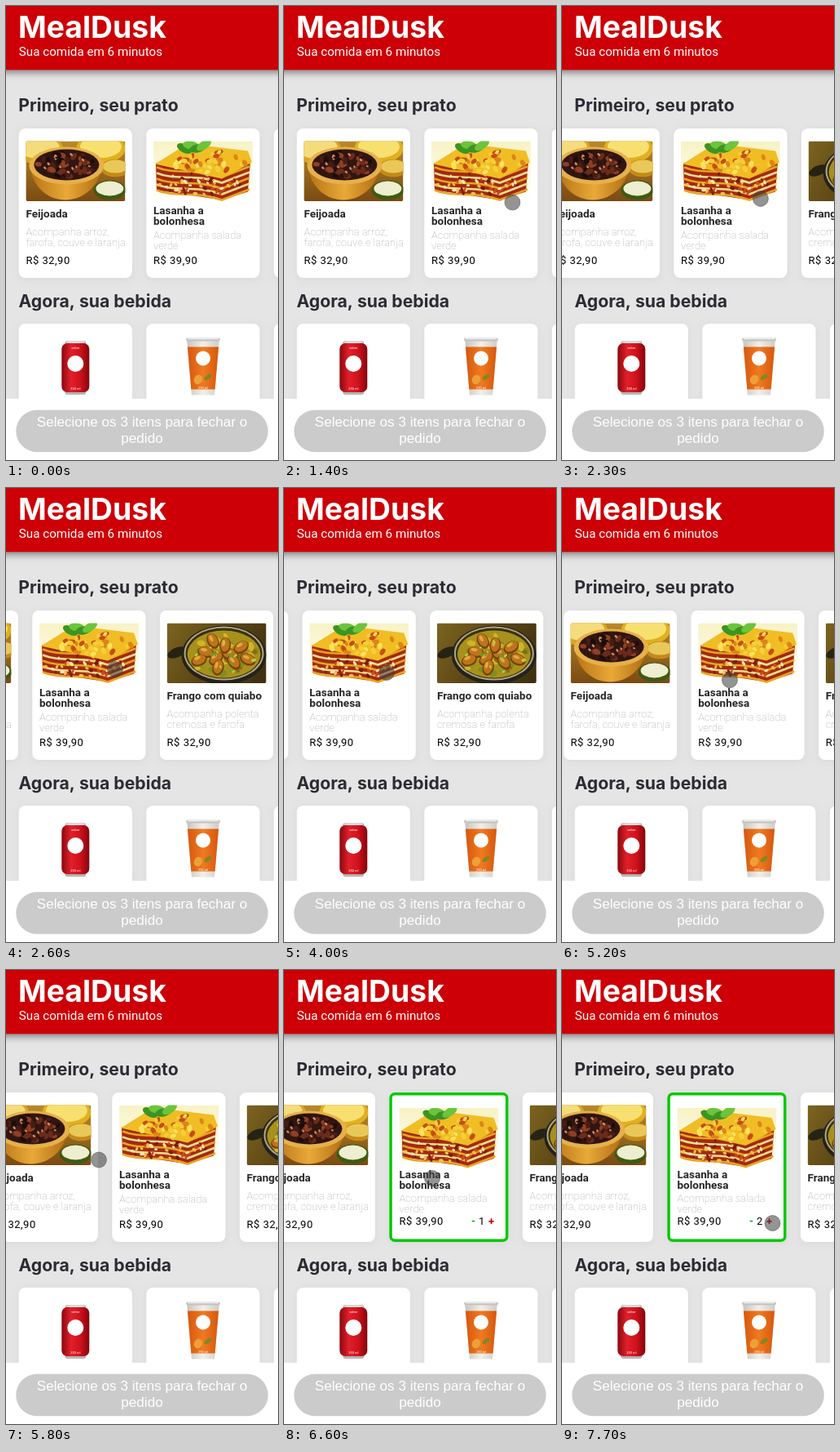
An HTML page with a canvas that plays this animation: 334 by 556 pixels, repeating every 8 s.

```html
<!DOCTYPE html>
<html lang="pt-BR">
<head>
<meta charset="utf-8">
<title>MealDusk</title>
<style>
html, body { margin: 0; width: 100%; height: 100%; overflow: hidden; background: #e5e5e5; }
canvas { display: block; width: 334px; height: 556px; }
</style>
</head>
<body>
<canvas id="stage"></canvas>
<script>
const W = 334, H = 556, LOOP = 8000, STEP = 100;
const canvas = document.getElementById('stage');
const ctx = canvas.getContext('2d');
const dpr = window.devicePixelRatio || 1;
canvas.width = W * dpr;
canvas.height = H * dpr;

const LEFT = 15.7, CARD_W = 139.2, CARD_H = 183, PITCH = 156.6, PAD = 8.7, BORDER = 3.5;
const IMG_W = 122, IMG_H = 73.5;
const ROBOTO = 'Roboto, sans-serif', INTER = 'Inter, sans-serif', ARIAL = '"Liberation Sans", Arial, sans-serif';
const SELECT_AT = 6500, COUNT_AT = 7700, CURSOR_AT = 1100;

// Each gesture glides the pointer, and the row of cards when dragging, to a new place.
const START = { x: 298, y: 446, scroll: 0 };
const move = (from, to, x, y, scroll) => ({ from, to, x, y, scroll });
const gestures = [
  move(1000, 1400, 280.5, 240.5),
  move(2200, 2600, 134, 222, 140),
  move(2800, 3000, 240, 246),
  move(3100, 3500, 232, 249, 149.7),
  move(3600, 4000, 126, 226),
  move(4000, 4700, 186, 231, 33),
  move(4700, 5300, 210, 236, 10),
  move(5400, 5800, 114, 232.5, 42),
  move(5900, 6300, 204, 245),
  move(6400, 6600, 182, 255, 43),
  move(6700, 7100, 265, 311),
  move(7200, 7500, 258.5, 310)
];

function poseAt(t) {
  const pose = { ...START };
  for (const g of gestures) {
    const u = Math.min(1, Math.max(0, (t - g.from) / (g.to - g.from)));
    for (const k in pose) pose[k] += ((g[k] ?? pose[k]) - pose[k]) * u;
  }
  return pose;
}

function rect(x, y, w, h, color) {
  ctx.fillStyle = color;
  ctx.fillRect(x, y, w, h);
}
function round(x, y, w, h, r, color) {
  ctx.fillStyle = color;
  ctx.beginPath();
  ctx.roundRect(x, y, w, h, r);
  ctx.fill();
}
function oval(x, y, rx, ry, color, turn = 0) {
  ctx.fillStyle = color;
  ctx.beginPath();
  ctx.ellipse(x, y, rx, ry, turn, 0, 7);
  ctx.fill();
}
function poly(color, ...p) {
  ctx.fillStyle = color;
  ctx.beginPath();
  for (let i = 0; i < p.length; i += 2) ctx.lineTo(p[i], p[i + 1]);
  ctx.fill();
}
function fade(x0, y0, x1, y1, ...colors) {
  const g = ctx.createLinearGradient(x0, y0, x1, y1);
  colors.forEach((c, i) => g.addColorStop(i / (colors.length - 1), c));
  return g;
}
function text(str, x, y, font, color, align = 'left') {
  ctx.font = font;
  ctx.fillStyle = color;
  ctx.textAlign = align;
  ctx.fillText(str, x, y);
}
function shadow(color, blur, dy, draw) {
  ctx.save();
  ctx.shadowColor = color;
  ctx.shadowBlur = blur * dpr;
  ctx.shadowOffsetY = dy * dpr;
  draw();
  ctx.restore();
}
// scatters small pieces inside an oval
function scatter(seed, n, x, y, rx, ry, size, ...colors) {
  const rnd = () => (seed = (seed * 16807) % 2147483647) / 2147483647;
  rnd();
  for (let i = 0; i < n; i++) {
    const a = rnd() * 6.28, d = Math.sqrt(rnd()), s = size * (0.6 + rnd() * 0.6);
    oval(x + Math.cos(a) * rx * d, y + Math.sin(a) * ry * d, s, s * 0.65, colors[i % colors.length], rnd() * 3);
  }
}
function sideBowl(x, y, r, rim, food) {
  oval(x, y + 2, r, r * 0.6, rim);
  oval(x, y, r * 0.85, r * 0.45, food);
}

function beanStew() {
  rect(0, 0, IMG_W, IMG_H, fade(0, 0, 0, IMG_H, '#b98a2a', '#7a4a12'));
  sideBowl(16, 8, 30, '#d9a425', '#f4dc7c');
  sideBowl(92, 7, 30, '#e0b020', '#f8e070');
  sideBowl(110, 31, 18, '#c48a18', '#e9c85a');
  sideBowl(103, 58, 20, '#3f5a12', '#eeeed0');
  ctx.fillStyle = fade(6, 0, 94, 0, '#b87416', '#e8a938', '#b06a12');
  ctx.beginPath();
  ctx.moveTo(5, 30);
  ctx.bezierCurveTo(12, 86, 84, 86, 94, 30);
  ctx.fill();
  oval(50, 30, 46, 23, '#e6b04a');
  oval(50, 29, 40, 19, '#301510');
  scatter(17, 46, 50, 29, 35, 15, 5, '#6b2b1b', '#1c0d0b', '#8f3f25', '#481d13');
  scatter(5, 12, 50, 28, 30, 12, 2, '#d08a60');
}

function lasagna() {
  rect(0, 0, IMG_W, IMG_H, fade(0, 0, 0, IMG_H, '#f8f2c4', '#ffffff'));
  poly('#a32a10', 3, 27, 119, 25, 116, 62, 84, 72, 4, 60);
  ctx.lineWidth = 2.6;
  for (let i = 0; i < 5; i++) {
    const y = 32 + i * 7;
    ctx.strokeStyle = i % 2 ? '#f3dd92' : '#e8a420';
    ctx.beginPath();
    ctx.moveTo(4, y);
    ctx.bezierCurveTo(28, y + 10, 50, y, 84, y + 12);
    ctx.lineTo(118, y - 1);
    ctx.stroke();
  }
  scatter(29, 55, 60, 53, 54, 14, 2.6, '#7b1c0c', '#cc4a18', '#f0c04a', '#fbe6b0');
  poly('#f0bd24', 2, 28, 42, 3, 116, 12, 121, 26, 84, 46);
  scatter(11, 45, 68, 25, 46, 13, 4, '#fbe25c', '#dc8418', '#f6ce38', '#c44e14');
  for (let i = 0; i < 4; i++) {
    oval(38 + i * 8, 9 - (i % 2) * 4, 10, 5, i % 2 ? '#6cc43c' : '#3c9422', 0.5 - i * 0.35);
  }
}

function chicken() {
  rect(0, 0, IMG_W, IMG_H, fade(0, 0, IMG_W, IMG_H, '#7c6420', '#5a4414', '#3c2e10'));
  oval(12, 36, 12, 6, '#262315', -0.4);
  oval(70, 39, 52, 36, '#24221a');
  oval(70, 37, 49, 33, '#b0a684');
  oval(70, 37, 47, 31, '#3a300e');
  oval(70, 38, 45, 29, '#a8901c');
  scatter(41, 40, 70, 38, 40, 25, 5, '#d0b428', '#7e8f1d', '#8a6a14');
  for (let i = 0; i < 10; i++) {
    const a = i * 2.4, d = Math.sqrt((i + 0.5) / 10);
    const x = 70 + Math.cos(a) * 34 * d, y = 37 + Math.sin(a) * 21 * d;
    oval(x, y + 1, 10, 7, '#75400c', a);
    oval(x, y, 8.5, 5.6, '#bd741a', a);
    oval(x - 2, y - 2, 4, 2, '#e2a840', a);
  }
  scatter(8, 16, 70, 38, 40, 24, 2.6, '#6f9a23', '#b4cc48');
}

function can(x, y) {
  round(x + 4, y, 26, 66, 3, '#b5b5b5');
  round(x, y + 3, 34, 60, 7, fade(x, 0, x + 34, 0, '#8c070f', '#e0202a', '#d0121c', '#84060d'));
  oval(x + 17, y + 1.5, 12, 1.6, '#dddddd');
  oval(x + 17, y + 28, 10, 10, '#ffffff');
  text('sabor', x + 17, y + 10, '4px ' + ROBOTO, '#ffffff', 'center');
  text('350 ml', x + 17, y + 60, '4px ' + ROBOTO, '#ffffff', 'center');
}

function cup(x, y) {
  const wall = (top, bottom, color) => {
    const a = top * 0.085, b = bottom * 0.085;
    poly(color, x + a, y + top, x + 40 - a, y + top, x + 40 - b, y + bottom, x + b, y + bottom);
  };
  wall(2, 70, fade(x, 0, x + 40, 0, '#c8c4be', '#f2efea', '#cfcbc5'));
  wall(11, 63, fade(x, 0, x + 40, 0, '#d4560e', '#f07a20', '#d4560e'));
  round(x - 1, y, 42, 4, 2, '#c4c4c2');
  round(x + 1, y, 38, 1.8, 1, '#eeeeec');
  oval(x + 20, y + 25, 9, 9, '#ffffff');
  oval(x + 14, y + 51, 5, 6, '#eda03a', 0.5);
  oval(x + 26, y + 48, 5, 2.5, '#7c8a24', -0.6);
  text('290 ml', x + 20, y + 62, '4px ' + ROBOTO, '#ffffff', 'center');
}

const dishes = [
  { name: ['Feijoada'], info: ['Acompanha arroz,', 'farofa, couve e laranja'], price: 'R$ 32,90', paint: beanStew },
  { name: ['Lasanha a', 'bolonhesa'], info: ['Acompanha salada', 'verde'], price: 'R$ 39,90', paint: lasagna },
  { name: ['Frango com quiabo'], info: ['Acompanha polenta', 'cremosa e farofa'], price: 'R$ 32,90', paint: chicken }
];

function cardBox(x, y, w) {
  shadow('rgba(0,0,0,.06)', 8, 2, () => round(x, y, w, CARD_H, 8, '#ffffff'));
}

function dishCard(dish, x, picked, count) {
  const top = 150, inset = picked ? BORDER : 0;
  cardBox(x, top, CARD_W + inset * 2);
  if (picked) {
    ctx.strokeStyle = '#03c804';
    ctx.lineWidth = BORDER;
    ctx.beginPath();
    ctx.roundRect(x + BORDER / 2, top + BORDER / 2, CARD_W + BORDER, CARD_H - BORDER, 5);
    ctx.stroke();
  }
  const left = x + PAD + inset;
  ctx.save();
  ctx.translate(left, top + 15.5 + inset);
  ctx.beginPath();
  ctx.roundRect(0, 0, IMG_W, IMG_H, 2);
  ctx.clip();
  dish.paint();
  ctx.restore();

  const two = dish.name.length > 1;
  dish.name.forEach((s, i) => text(s, left, (two ? 255.2 : 259) + i * 13, '700 13.5px ' + ROBOTO, '#262626'));
  const infoY = (two ? 285.3 : 281) - (picked ? 1.5 : 0);
  dish.info.forEach((s, i) => text(s, left, infoY + i * 13, '100 13px ' + ROBOTO, '#a8a8a8'));

  const priceY = picked ? 312 : 316, price = '13px ' + ROBOTO;
  ctx.letterSpacing = '0.5px';
  text(dish.price, left, priceY, price, '#000000');
  if (picked) {
    text('-', left + 88.5, priceY, '700 ' + price, '#03a804');
    text(count, left + 97.5, priceY, price, '#000000');
    text('+', left + 109.5, priceY, '700 ' + price, '#cc0005');
  }
  ctx.letterSpacing = '0px';
}

function drinks() {
  for (let i = 0; i < 3; i++) cardBox(LEFT + i * PITCH, 389, CARD_W);
  can(68.3, 410);
  cup(222, 406.5);
}

function chrome() {
  shadow('rgba(0,0,0,.42)', 8, 3.5, () => rect(-10, -10, W + 20, 88.3, '#cc0006'));
  text('MealDusk', 15, 39, '700 37.3px ' + INTER, '#ffffff');
  text('Sua comida em 6 minutos', 15.8, 61, '15.2px ' + ROBOTO, '#ffffff');

  rect(0, 481, W, 75, '#ffffff');
  round(12.3, 494.8, 309.5, 51.5, 25.7, '#cbcbcb');
  text('Selecione os 3 itens para fechar o', W / 2, 515, '17.1px ' + ARIAL, '#ffffff', 'center');
  text('pedido', W / 2, 535, '17.1px ' + ARIAL, '#ffffff', 'center');
}

function pointer({ x, y }) {
  oval(x, y, 9.5, 9.5, 'rgba(64,64,64,.56)');
  ctx.strokeStyle = 'rgba(60,60,60,.45)';
  ctx.lineWidth = 1;
  ctx.stroke();
}

function draw(t) {
  ctx.setTransform(dpr, 0, 0, dpr, 0, 0);
  rect(0, 0, W, H, '#e5e5e5');
  text('Primeiro, seu prato', 15.3, 129, '700 21.2px ' + INTER, '#2d2a33');
  text('Agora, sua bebida', 15.5, 369, '700 21.2px ' + INTER, '#2d2a33');

  const pose = poseAt(t), picked = t >= SELECT_AT;
  dishes.forEach((dish, i) => {
    const push = picked && i === 2 ? BORDER * 2 : 0;
    dishCard(dish, LEFT + i * PITCH + push - pose.scroll, picked && i === 1, t >= COUNT_AT ? '2' : '1');
  });
  drinks();
  chrome();
  if (t >= CURSOR_AT) pointer(pose);
}

function tick() {
  const t = performance.now() % LOOP;
  draw(Math.floor(t / STEP) * STEP);
  requestAnimationFrame(tick);
}
tick();
</script>
</body>
</html>
```
